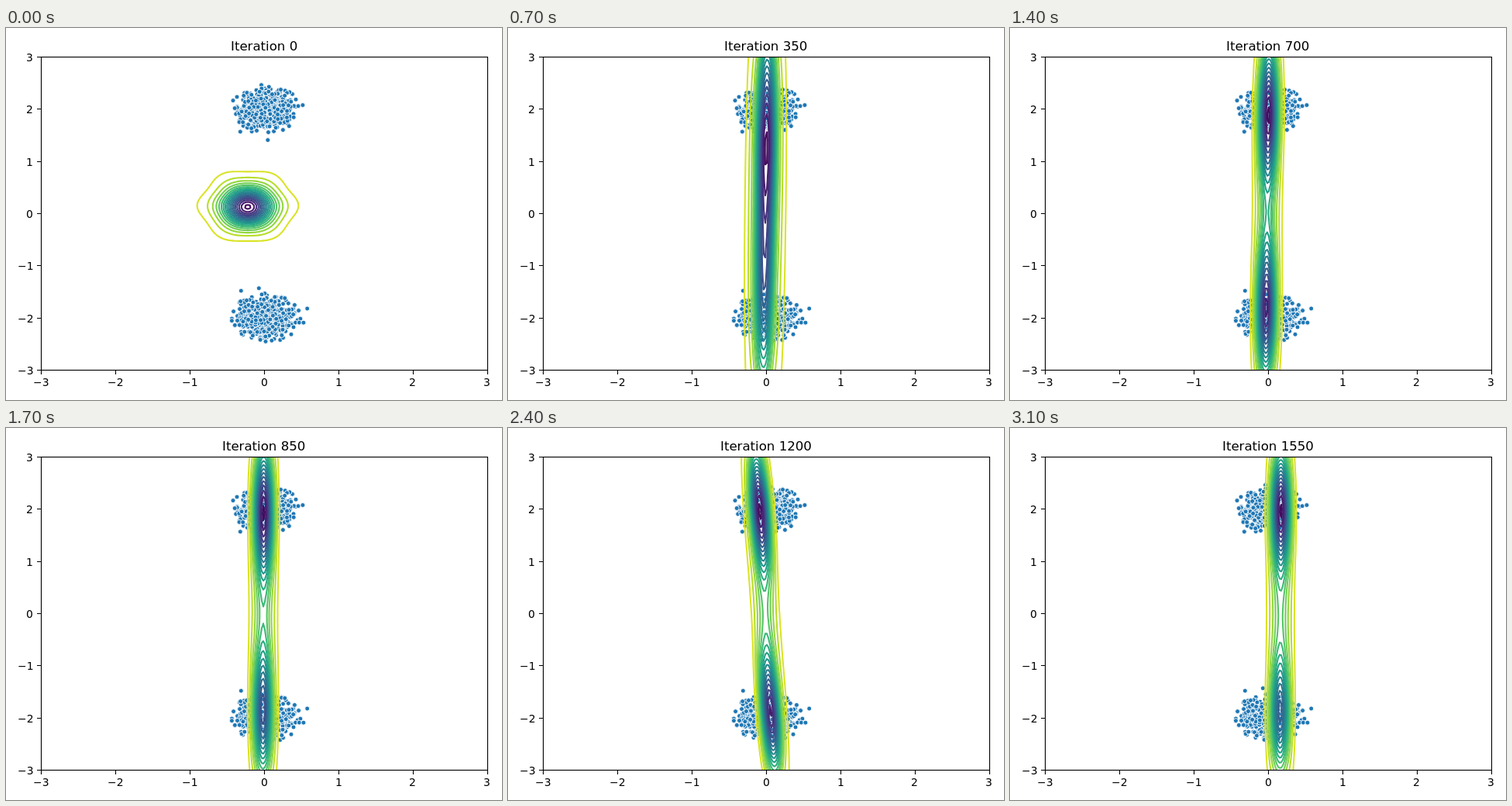
Animation, 640 px wide and 480 px high, one loop 5.1 s. Source, as an HTML page:

```html
<!DOCTYPE html>
<html lang="en">
<head>
<meta charset="utf-8">
<title>Density fit</title>
<style>
  html, body { margin: 0; width: 100%; height: 100%; overflow: hidden; background: #fff; }
  svg { display: block; width: 640px; height: 480px; }
  text { font: 13.89px "DejaVu Sans", sans-serif; }
  #title { font-size: 16.6px; }
  #dots circle { fill: #1f77b4; stroke: #fff; stroke-width: .9; }
  #lines path { fill: none; stroke-width: 2.08; stroke-linecap: round; }
  #axes path, #frame { fill: none; stroke: #000; stroke-width: 1.11; }
</style>
</head>
<body>
<svg viewBox="0 0 640 480">
  <clipPath id="box"><rect x="45" y="37" width="577" height="405"/></clipPath>
  <rect width="640" height="480" fill="#fff"/>
  <g clip-path="url(#box)">
    <g id="dots"></g>
    <g id="lines"></g>
  </g>
  <rect id="frame" x="45.5" y="37.5" width="576" height="404"/>
  <g id="axes"></g>
  <text id="title" y="29"></text>
</svg>
<script>
const $ = id => document.getElementById(id);
const { exp, cos, sin, PI, hypot, atan2, round, floor, min, max } = Math;
const X = v => 333 + 95.95 * v;
const Y = v => 239.5 - 67.33 * v;

function add(parent, tag, attrs) {
  const el = document.createElementNS('http://www.w3.org/2000/svg', tag);
  for (const k in attrs) el.setAttribute(k, attrs[k]);
  return parent.appendChild(el);
}

// Text starts on a whole pixel; align is 0.5 for centred, 1 for right
function setText(el, text, x, align) {
  el.textContent = text;
  el.setAttribute('x', round(x - align * el.getComputedTextLength()));
}

// Axes
for (let v = -3; v <= 3; v++) {
  const name = String(v).replace('-', '\u2212');
  const x = 333.5 + 96 * v, y = round(Y(v) - .5) + .5;
  add($('axes'), 'path', { d: `M${x} 442v5M45 ${y}h-5` });
  setText(add($('axes'), 'text', { y: 462 }), name, X(v), .5);
  setText(add($('axes'), 'text', { y: y + 5.5 }), name, 35.28, 1);
}

// Two round clusters of samples and a few outliers
let seed = 71;
const rand = () => (seed = (seed * 16807) % 2147483647) / 2147483647;
const dot = (x, y) => add($('dots'), 'circle', { cx: X(x).toFixed(1), cy: Y(y).toFixed(1), r: 3 });

for (const mean of [2, -2]) {
  for (let n = 0; n < 560;) {
    const r = .2 * Math.sqrt(-2 * Math.log(rand())), a = rand() * 2 * PI;
    if (r > .47) continue;
    dot(.02 + r * cos(a), mean + r * sin(a));
    n++;
  }
}
[[-.32, 1.57], [.05, 1.41], [.52, 2.08], [.58, -1.82], [.53, -2.09], [-.31, -1.48], [-.07, -1.43]]
  .forEach(p => dot(...p));

// The density: a blob that stretches upright, parts into two modes, leans and drifts right
const fall = (t, tau) => exp(-t / tau);
const ramp = (t, a, b) => { const u = max(0, min(1, (t - a) / (b - a))); return u * u * (3 - 2 * u); };

function parts(t) {
  const birth = 1 - fall(t, 60);
  const split = 132 * (1 - fall(t, 430));
  const sx = 7.8 + 13 * fall(t, 230);
  const sy = 50 + 150 * fall(t, 510) * birth - 34 * fall(t, 60);
  const x = 332 - 20 * fall(t, 80) + 17 * ramp(t, 2400, 3100);
  const y = 237 - 6 * fall(t, 80);
  const bell = exp(-(((t - 2400) / 480) ** 2));
  const k = .085 * bell - .01 * birth;
  const lean = 1.5 * birth - 8.5 * bell;
  const lower = .84 + .11 * cos(2 * PI * (t - 1350) / 1150);
  const off = 14 + 35 * fall(t, 400);
  const wing = birth * (.05 + .45 * fall(t, 270));
  const side = s => ({ w: wing, x: x + s * off, y: 235, sx: off / 3.1, sy: 236, k });
  return [
    { w: 1, x: x + lean, y: y - split, sx, sy, k },
    { w: lower, x: x - lean, y: y + split, sx, sy, k },
    { w: .25 * (1 - fall(t, 900)), x, y: 238, sx, sy: 60, k },
    side(-1), side(1),
    { w: .3 * ramp(-t, -200, 0), x: 312, y: 229, sx: 42, sy: 30, k: 0, ripple: .08 }
  ];
}

function bump(p, x, y) {
  const v = y - p.y, a = (x - p.x - p.k * v) / p.sx, b = v / p.sy;
  let r = hypot(a, b);
  if (p.ripple) r /= 1 + p.ripple * cos(6 * atan2(b, a));
  return p.w * exp(-r * r / 2);
}

// Density on a grid
const x0 = 232, y0 = 34, dx = 2, dy = 3, nx = 86, ny = 138;
const field = new Float64Array(nx * ny);

function fill(t) {
  const list = parts(t).filter(p => p.w > 0);
  let top = 0;
  for (let j = 0; j < ny; j++) for (let i = 0; i < nx; i++) {
    let sum = 0;
    for (const p of list) sum += bump(p, x0 + i * dx, y0 + j * dy);
    field[j * nx + i] = sum;
    top = max(top, sum);
  }
  return top;
}

// Marching squares
function contour(level) {
  let d = '';
  for (let j = 0; j < ny - 1; j++) for (let i = 0; i < nx - 1; i++) {
    const o = j * nx + i;
    const c = [field[o], field[o + 1], field[o + nx + 1], field[o + nx]];
    const hits = [];
    for (let e = 0; e < 4; e++) {
      const a = c[e], b = c[(e + 1) % 4];
      if (a > level === b > level) continue;
      const u = (level - a) / (b - a);
      const px = [u, 1, 1 - u, 0][e], py = [0, u, 1, 1 - u][e];
      hits.push((x0 + (i + px) * dx).toFixed(1) + ' ' + (y0 + (j + py) * dy).toFixed(1));
    }
    for (let h = 0; h < hits.length; h += 2) d += `M${hits[h]}L${hits[h + 1]}`;
  }
  return d;
}

// Colour scale from yellow (low) to violet (high)
const scale = ['fde725', 'b5de2b', '6ece58', '35b779', '1f9e89', '26828e', '31688e', '3e4a89', '482878', '440154']
  .map(h => [0, 2, 4].map(i => parseInt(h.slice(i, i + 2), 16)));

function colour(u) {
  const p = u * (scale.length - 1), i = min(scale.length - 2, floor(p));
  return `rgb(${scale[i].map((v, n) => round(v + (scale[i + 1][n] - v) * (p - i)))})`;
}

const count = 18;
const rings = Array.from({ length: count }, (_, i) =>
  add($('lines'), 'path', { stroke: colour((i + 1) / (count + .5)) }));

let shown = -1;
function draw(ms) {
  const step = min(31, floor((ms % 5100) / 100));
  if (step === shown) return;
  shown = step;
  setText($('title'), 'Iteration ' + step * 50, 333, .5);
  const top = fill(step * 100) * .987;
  rings.forEach((ring, i) => ring.setAttribute('d', contour(top * (i + 1) / count)));
}

const start = performance.now();
function tick() {
  draw(performance.now() - start);
  requestAnimationFrame(tick);
}
tick();
</script>
</body>
</html>
```
